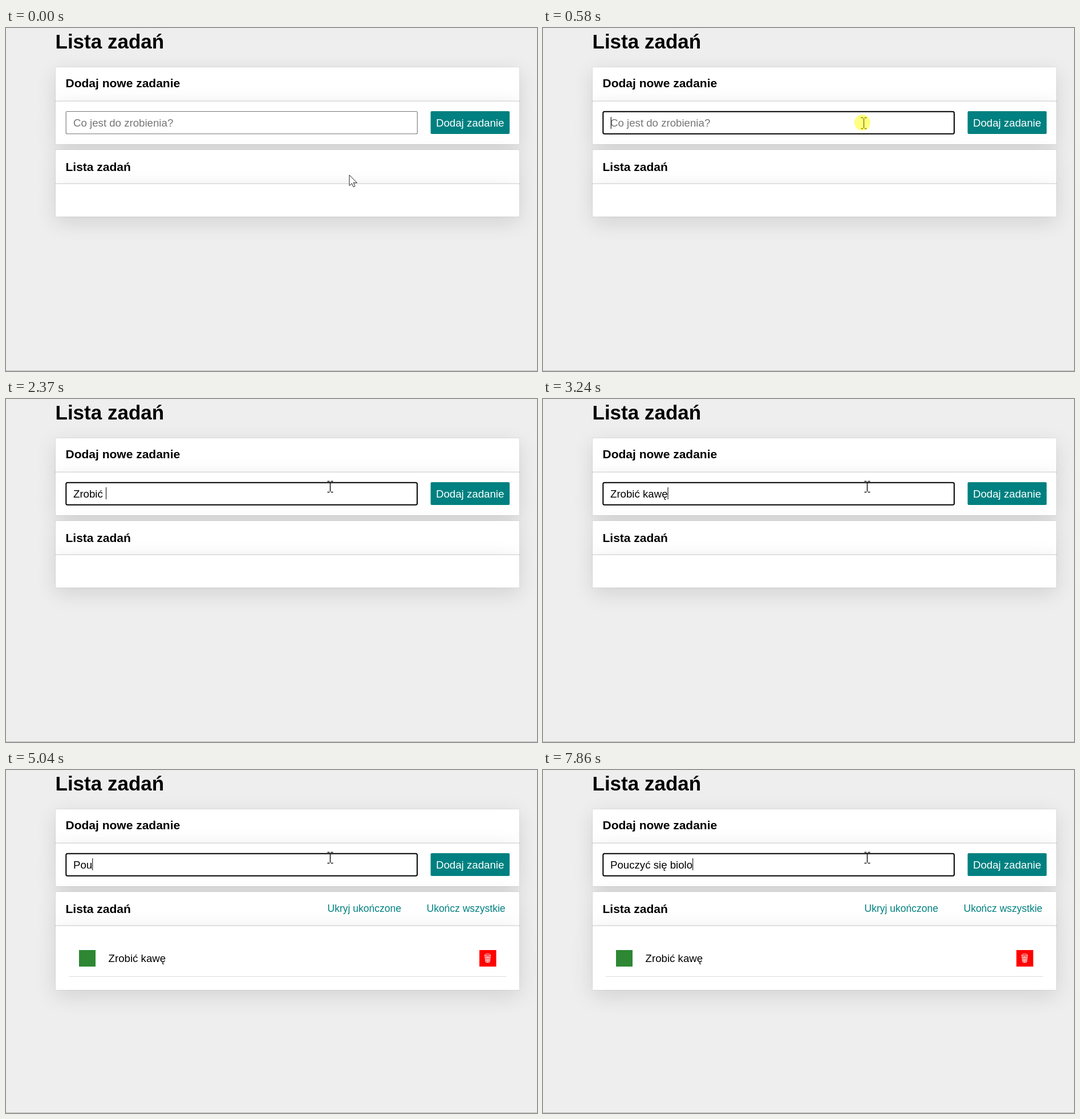
An HTML page that plays this animation: 931 by 602 pixels, repeating every 7.99 s.

```html
<!DOCTYPE html>
<html lang="pl">
<head>
<meta charset="utf-8">
<title>Lista zadań</title>
<style>
  html, body { margin: 0; width: 100%; height: 100%; overflow: hidden; background: #eee; }
  .panel {
    position: absolute; left: 87px; width: 813px; box-sizing: border-box;
    background: #fff; box-shadow: 0 10px 36px rgba(0, 0, 0, .12), 0 0 0 1px rgba(0, 0, 0, .05);
  }
  .head { height: 60px; }
  .body { border-top: 1.5px solid #d6d6d6; }
  svg { position: absolute; left: 0; top: 0; }
  text { font: 18.667px "Liberation Sans", Arial, sans-serif; white-space: pre; }
  .title { font-size: 35px; font-weight: bold; }
  .sub { font-size: 21px; font-weight: bold; }
  .link { font-size: 17.5px; fill: teal; }
</style>
</head>
<body>
<div class="panel head" style="top:68.5px"></div>
<div class="panel body" style="top:127.5px;height:76px"></div>
<div class="panel head" style="top:214px"></div>
<div class="panel body" id="list" style="top:273px"></div>

<svg width="931" height="602" viewBox="0 0 931 602">
  <text class="title" x="86.5" y="36">Lista zadań</text>
  <text class="sub" x="104.5" y="104">Dodaj nowe zadanie</text>
  <text class="sub" x="104.5" y="250.5">Lista zadań</text>

  <rect id="field" fill="#fff"/>
  <text id="entry" x="118" y="172.5"></text>
  <rect id="caret" width="1.2" height="21" fill="#222"/>

  <rect x="744.5" y="146" width="138.5" height="40" rx="2" fill="teal"/>
  <text x="754" y="172.5" fill="#fff">Dodaj zadanie</text>

  <g id="task">
    <text class="link" x="563.5" y="249">Ukryj ukończone</text>
    <text class="link" x="737.5" y="249">Ukończ wszystkie</text>
    <rect x="128" y="316" width="29" height="29" fill="#2e8733"/>
    <text x="179.6" y="336.5">Zrobić kawę</text>
    <rect x="830" y="316" width="29.5" height="29" fill="red"/>
    <g fill="none" stroke="#fff" stroke-width=".9">
      <ellipse cx="844.5" cy="324.5" rx="5" ry="1.6"/>
      <path d="M839.5 325l1.5 12q3.5 1.6 7 0l1.5-12M842 326l.9 11M844.5 326v12M847 326l-.9 11M840.5 329.5h8M841 333.5h7"/>
    </g>
    <path d="M110 362.5H877" stroke="#ddd"/>
  </g>

  <path d="M0 601.5H931" stroke="#b8b8b8"/>

  <path id="arrow" d="M0 0V18.8L4.3 14.8L7.2 21L10 19.8L7.2 13.7H13.4Z" fill="#fff" stroke="#222" stroke-width="1"/>
  <path id="beam" d="M-5 -9.5H-1.2M1.2 -9.5H5M0 -8.5V8.5M-5 9.5H-1.2M1.2 9.5H5" fill="none" stroke="#111" stroke-width="1.5"/>
  <circle id="press" r="14" fill="#ff0" fill-opacity=".5"/>
</svg>

<script>
  const LOOP = 7990, FOCUS = 510, RELEASE = 710, SUBMIT = 3570, BLINK_OFF = 3770;
  const EMPTY = "Co jest do zrobienia?";
  const words = [
    { text: "Zrobić kawę", until: SUBMIT,
      keys: [1040, 1370, 1640, 1770, 1900, 2230, 2370, 2580, 2650, 2910, 3240] },
    { text: "Pouczyć się biolo", until: LOOP,
      keys: [4370, 4570, 5040, 5170, 5240, 5360, 5760, 5960, 6180, 6310, 6590, 6770,
             7100, 7300, 7430, 7700, 7860] }
  ];
  // time, x, y of the pointer
  const path = [[0, 602, 258], [70, 600, 253], [210, 585, 218], [350, 569, 183],
                [450, 562, 168], [580, 562.5, 167], [710, 566, 159], [780, 568.5, 154]];

  const $ = id => document.getElementById(id);
  const set = (id, attrs) => Object.entries(attrs).forEach(([k, v]) => $(id).setAttribute(k, v));
  const show = (id, on) => { $(id).style.display = on ? "" : "none"; };

  function pointerAt(t) {
    const held = t < 560 ? Math.floor(t / 70) * 70 : t < 580 ? 510 : t < 710 ? 580 : t < 780 ? 710 : 780;
    const next = path.findIndex(p => p[0] >= held);
    if (next === 0) return path[0].slice(1);
    const [t0, x0, y0] = path[next - 1], [t1, x1, y1] = path[next];
    const k = (held - t0) / (t1 - t0);
    return [x0 + (x1 - x0) * k, y0 + (y1 - y0) * k];
  }

  function drawField(t) {
    const focused = t >= FOCUS;
    set("field", focused
      ? { x: 105.3, y: 146.7, width: 615.6, height: 39, rx: 2.5, stroke: "#000", "stroke-width": 2 }
      : { x: 105.2, y: 146.5, width: 616, height: 39.2, rx: 2, stroke: "#767676", "stroke-width": 1.1 });

    const word = words.find(w => t < w.until);
    const typed = word.text.slice(0, word.keys.filter(k => k <= t).length);
    const entry = $("entry");
    entry.textContent = typed || EMPTY;
    entry.setAttribute("fill", typed ? "#000" : "#757575");

    set("caret", typed
      ? { x: 117.9 + entry.getComputedTextLength(), y: 155 }
      : { x: 118.7, y: 156 });
    show("caret", focused && (typed || t < BLINK_OFF));
  }

  function drawPointer(t) {
    const [x, y] = pointerAt(t);
    const inField = y < 186;
    set("arrow", { transform: `translate(${x} ${y})` });
    set("beam", { transform: `translate(${x} ${y})` });
    set("press", { cx: x - 2.5, cy: y - 1 });
    show("arrow", !inField);
    show("beam", inField);
    show("press", t >= FOCUS && t < RELEASE);
  }

  function render(t) {
    const added = t >= SUBMIT;
    $("list").style.height = (added ? 113 : 58) + "px";
    show("task", added);
    drawField(t);
    drawPointer(t);
  }

  const start = performance.now();
  function tick() {
    render((performance.now() - start) % LOOP);
    requestAnimationFrame(tick);
  }
  tick();
</script>
</body>
</html>
```
